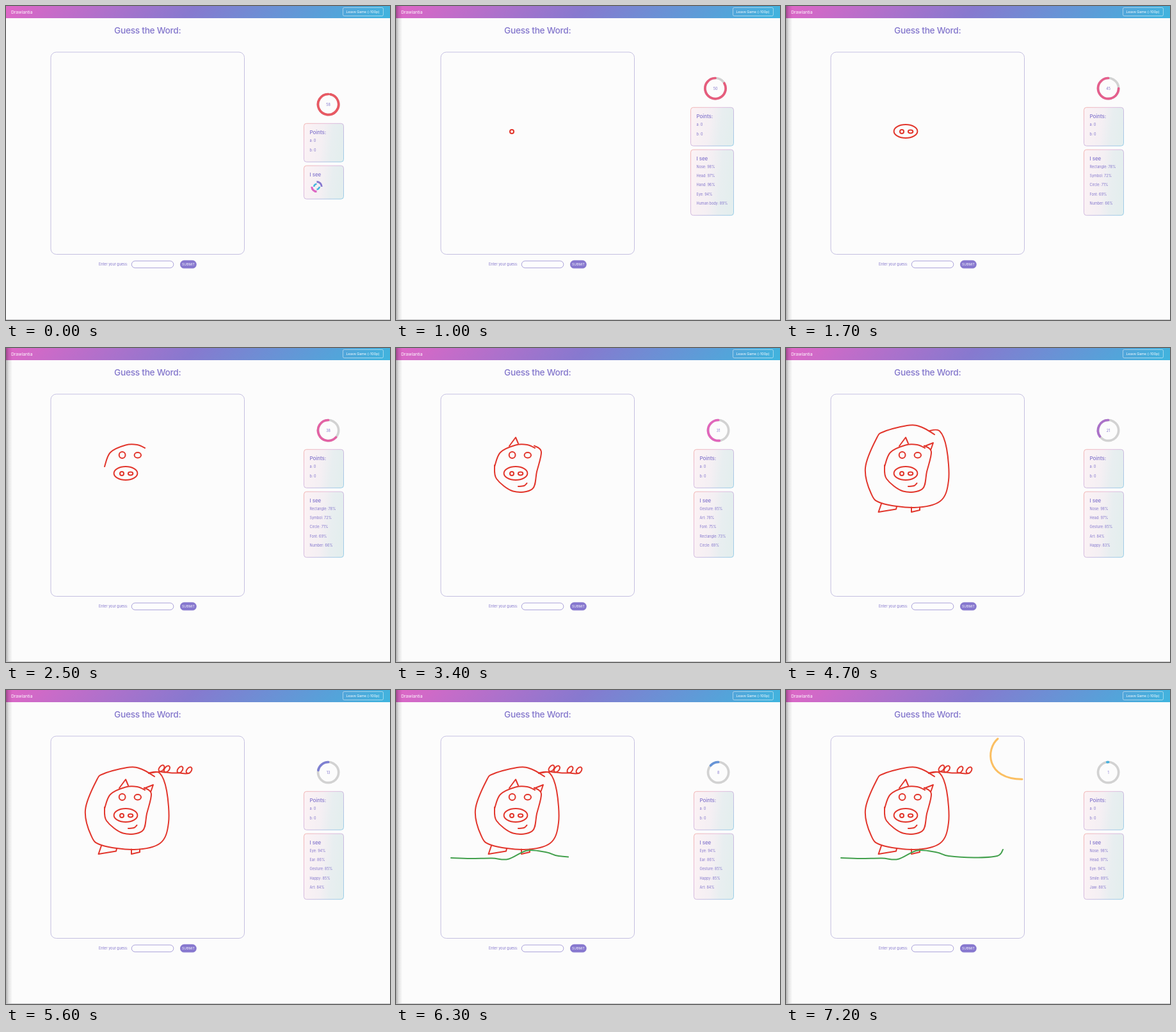
Recreate the animation shown at these times as an HTML page. Size 600x490 px, loop 7300 ms.

```html
<!DOCTYPE html>
<html lang="en">
<head>
<meta charset="utf-8">
<title>Drawing game</title>
<style>
html, body { margin: 0; width: 100%; height: 100%; overflow: hidden; background: #fcfcfc; }
svg { display: block; width: 600px; height: 490px; }
text { font-family: Inter, Roboto, sans-serif; font-size: 5.5px; fill: #8376cc; }
.title { font-size: 13.7px; font-weight: 500; letter-spacing: -.02em; }
.head { font-size: 8px; font-weight: 500; letter-spacing: -.01em; }
.white { fill: #fff; }
.mid { text-anchor: middle; }
.line { fill: none; stroke-linecap: round; stroke-linejoin: round; }
.card { fill: url(#cardFill); stroke: url(#cardEdge); stroke-width: .8; }
</style>
</head>
<body>
<svg viewBox="0 0 600 490">
  <defs>
    <linearGradient id="bar" gradientUnits="userSpaceOnUse" x1="145.2" y1="-145.2" x2="454.8" y2="164.2">
      <stop offset="0" stop-color="#e066c6"/>
      <stop offset=".48" stop-color="#8779cf"/>
      <stop offset="1" stop-color="#3fb5de"/>
    </linearGradient>
    <linearGradient id="cardFill" x1="0" y1="0" x2="1" y2=".12">
      <stop offset="0" stop-color="#fcf2f5"/><stop offset=".5" stop-color="#f4eff3"/>
      <stop offset=".75" stop-color="#e8eef0"/><stop offset="1" stop-color="#e4eeee"/>
    </linearGradient>
    <linearGradient id="cardEdge" x1="0" y1="0" x2="1" y2="1">
      <stop offset="0" stop-color="#f0a59f"/><stop offset=".3" stop-color="#e2acd2"/>
      <stop offset=".6" stop-color="#b9acdc"/><stop offset="1" stop-color="#7fc5e4"/>
    </linearGradient>
    <linearGradient id="edge">
      <stop offset="0" stop-color="#000" stop-opacity=".3"/>
      <stop offset=".4" stop-color="#000" stop-opacity=".11"/>
      <stop offset="1" stop-color="#000" stop-opacity="0"/>
    </linearGradient>
  </defs>
  <rect width="600" height="490" fill="#fcfcfc"/>
  <rect width="600" height="19" fill="url(#bar)"/>
  <text class="white" x="8" y="11.7" style="font-size:6.7px">Drawlantia</text>
  <rect x="526.5" y="2.5" width="63" height="13" rx="2" fill="none" stroke="#fff" stroke-width=".6" opacity=".8"/>
  <text class="white mid" x="557.5" y="11" style="font-size:5.4px">Leave Game (-100p)</text>
  <text class="title" x="169" y="43.4">Guess the Word:</text>
  <rect x="70" y="72" width="302.5" height="315.5" rx="8.5" fill="#fcfcfc" stroke="#bfb9de" stroke-width=".9"/>
  <g id="art" class="line"></g>
  <text x="145" y="405.4">Enter your guess:</text>
  <rect x="196.3" y="397.9" width="65.5" height="10.8" rx="5.4" fill="#fdfdfd" stroke="#9389d0" stroke-width=".8"/>
  <rect x="272" y="396.8" width="25.7" height="12.8" rx="6.4" fill="#8778cf"/>
  <text class="white mid" x="285" y="405.1" style="font-size:5px;letter-spacing:.1px">SUBMIT</text>

  <g id="timer">
    <circle r="16.1" fill="none" stroke="#d2d2d2" stroke-width="3.7"/>
    <path id="arc" class="line" stroke-width="3.7"/>
    <text id="count" class="mid" y="2"></text>
  </g>
  <g id="points">
    <rect class="card" height="60" rx="4"/>
    <text class="head" x="9" y="17.2">Points:</text>
    <text x="9" y="29">a: 0</text>
    <text x="9" y="43.4">b: 0</text>
  </g>
  <g id="seen">
    <rect class="card" rx="4"/>
    <text class="head" x="9" y="17">I see</text>
    <g id="labels"></g>
    <g id="spin" transform="translate(20 32.7)" fill="none" stroke-width="3">
      <g id="outer">
        <path d="M0-7.7A7.7 7.7 0 0 1 7.7 0" stroke="#8578cf"/>
        <path d="M0 7.7A7.7 7.7 0 0 1-7.7 0" stroke="#dd66c4"/>
      </g>
      <path id="inner" d="M-4.2 0A4.2 4.2 0 0 1 0-4.2M4.2 0A4.2 4.2 0 0 1 0 4.2" stroke="#45b4de" stroke-width="2.6"/>
    </g>
  </g>
  <rect id="shade" width="10" height="490" fill="url(#edge)"/>
  <path d="M0 489.5H600" stroke="#c4c4c6"/>
</svg>
<script>
const LOOP = 7300, STEP = 100, LOADED = 600, LIFT = 20;
const $ = id => document.getElementById(id);
const set = (el, attrs) => { for (const k in attrs) el.setAttribute(k, attrs[k]); };
const add = (parent, tag, attrs) => {
  const el = document.createElementNS('http://www.w3.org/2000/svg', tag);
  set(el, attrs);
  return parent.appendChild(el);
};
const clamp = v => Math.max(0, Math.min(1, v));
const parse = text => text.split(' ').map(s => s.split(',').map(Number));

// Smooth curve through all points
function through(p) {
  let d = 'M' + p[0];
  for (let i = 0; i < p.length - 1; i++) {
    const b = p[i], c = p[i + 1], a = p[i - 1] || b, e = p[i + 2] || c;
    d += 'C' + b.map((v, k) => v + (c[k] - a[k]) / 6);
    d += ' ' + c.map((v, k) => v - (e[k] - b[k]) / 6) + ' ' + c;
  }
  return d;
}
const curve = text => through(parse(text));

// Loop drawn once around, starting at the top
const oval = (x, y, rx, ry) =>
  `M${x} ${y - ry}a${rx} ${ry} 0 0 0 0 ${2 * ry}a${rx} ${ry} 0 0 0 0 ${-2 * ry}`;

// Curls standing on a line, one for each centre
function curls(centres) {
  const p = parse('223,130 235,128');
  centres.forEach((x, i) => {
    for (let a = 0; a < 6.3; a += Math.PI / 3)
      p.push([x + 4 * Math.sin(a) - 2 * Math.cos(a), 122.3 + i + 5 * Math.cos(a)]);
  });
  return through(p);
}

// Each part shares its time among its strokes by length
function part(from, to, paths, color = '#e2362c', width = 2) {
  const list = paths.map(d => {
    const el = add($('art'), 'path', { d, stroke: color, 'stroke-width': width });
    return { el, len: el.getTotalLength() };
  });
  const total = list.reduce((sum, s) => sum + s.len + LIFT, -LIFT);
  return t => {
    let pen = (t - from) / (to - from) * total;
    for (const { el, len } of list) {
      const drawn = Math.min(pen, len);
      el.style.display = drawn > 0 ? '' : 'none';
      el.setAttribute('stroke-dasharray', drawn < len ? `${Math.max(0, drawn)} 999` : 'none');
      pen -= len + LIFT;
    }
  };
}

const parts = [
  // face and brow
  part(900, 2490, [
    oval(181, 196, 3, 3), oval(194.6, 196, 3.7, 2.4), oval(187, 195.5, 18.4, 10.5),
    oval(181.6, 167, 4.9, 5), oval(205.8, 167.3, 5.2, 4.2),
    curve('154,185 163,163 187,151.5 205,151 217,156')
  ]),
  // cheeks, left ear, mouth
  part(2540, 3380, [
    curve('216,152.5 227,162 220,193 213,220 183,223.5 157,204 154,183'),
    'M177 153L187 139.5L191 149', curve('191,216 200,215 204.5,211')
  ]),
  // right ear, body, legs
  part(3450, 4680, [
    'M216 153.5L230 148L226.5 158',
    curve('232,135 213,124 193,120.5 153,130.5 141,142 124,187 133,227 149,242 200,249 241,239 254,207 251,157 240,129.5 223,129.5'),
    'M149 243L144.5 256L172 251.5L173 247.5', 'M196 248.5V256L209 253V248.5'
  ]),
  part(4850, 5550, [curls([243, 251.5, 272, 286])]),
  part(5800, 6500, [
    curve('86,262 116,263 150,262.5 175,264 205,250.5 236,253.5 254,259 294,261.5 330,259 339,249')
  ], '#43a04d'),
  part(6700, 7100, ['M331 76C312 92 312 139 369 139.3'], '#fbbf62', 3)
];

const guesses = [
  [LOADED, 'Nose: 98%|Head: 97%|Hand: 96%|Eye: 94%|Human body: 89%'],
  [1700, 'Rectangle: 78%|Symbol: 72%|Circle: 71%|Font: 69%|Number: 66%'],
  [3000, 'Gesture: 85%|Art: 78%|Font: 75%|Rectangle: 73%|Circle: 69%'],
  [4000, 'Nose: 98%|Head: 97%|Gesture: 85%|Art: 84%|Happy: 83%'],
  [5200, 'Eye: 94%|Ear: 86%|Gesture: 85%|Happy: 85%|Art: 84%'],
  [6400, 'Nose: 98%|Head: 97%|Eye: 94%|Smile: 89%|Jaw: 88%']
];
const rows = [0, 1, 2, 3, 4].map(i => add($('labels'), 'text', { x: 9, y: 28.5 + i * 14.35 }));

// Red until half time, then pink, purple and blue
const RED = [232, 88, 92], PINK = [225, 102, 190], PURPLE = [135, 120, 208], BLUE = [64, 180, 222];
const mix = (a, b, k) => `rgb(${a.map((v, i) => Math.round(v + (b[i] - v) * k))})`;
const ringColor = left =>
  left > 30 ? mix(PINK, RED, left / 30 - 1) :
  left > 15 ? mix(PURPLE, PINK, left / 15 - 1) : mix(BLUE, PURPLE, left / 15);

function drawTimer(t, x, y) {
  const left = Math.floor(58.95 - 8.03 * t / 1000);
  const a = left / 30 * Math.PI, r = 16.1;
  set($('timer'), { transform: `translate(${x} ${y})` });
  set($('arc'), {
    d: `M0 ${-r}A${r} ${r} 0 ${left > 30 ? 1 : 0} 0 ${-r * Math.sin(a)} ${-r * Math.cos(a)}`,
    stroke: ringColor(left)
  });
  $('count').textContent = left;
}

function draw(t) {
  parts.forEach(p => p(t));

  const loaded = t >= LOADED;
  const list = guesses.filter(g => g[0] <= t).pop();
  const wide = list === guesses[0];
  const x = wide ? 460.5 : 465.5, width = wide ? 67 : 62, y = loaded ? 158.3 : 183.3;
  set($('points'), { transform: `translate(${x} ${y})` });
  set($('seen'), { transform: `translate(${x} ${y + 65.9})` });
  set($('points').firstElementChild, { width });
  set($('seen').firstElementChild, { width, height: loaded ? 102.5 : 52 });
  const names = list ? list[1].split('|') : [];
  rows.forEach((r, i) => { r.textContent = names[i] || ''; });
  drawTimer(t, wide ? 499 : 503.6, y - 29.7);

  $('spin').style.display = loaded ? 'none' : '';
  set($('outer'), { transform: `rotate(${t * .72})` });
  set($('inner'), { transform: `rotate(${-t * .72})` });
  set($('shade'), { opacity: clamp((t - 300) / 400) });
}

function tick(now) {
  draw(Math.floor(now % LOOP / STEP) * STEP);
  requestAnimationFrame(tick);
}
draw(0);
requestAnimationFrame(tick);
</script>
</body>
</html>
```
